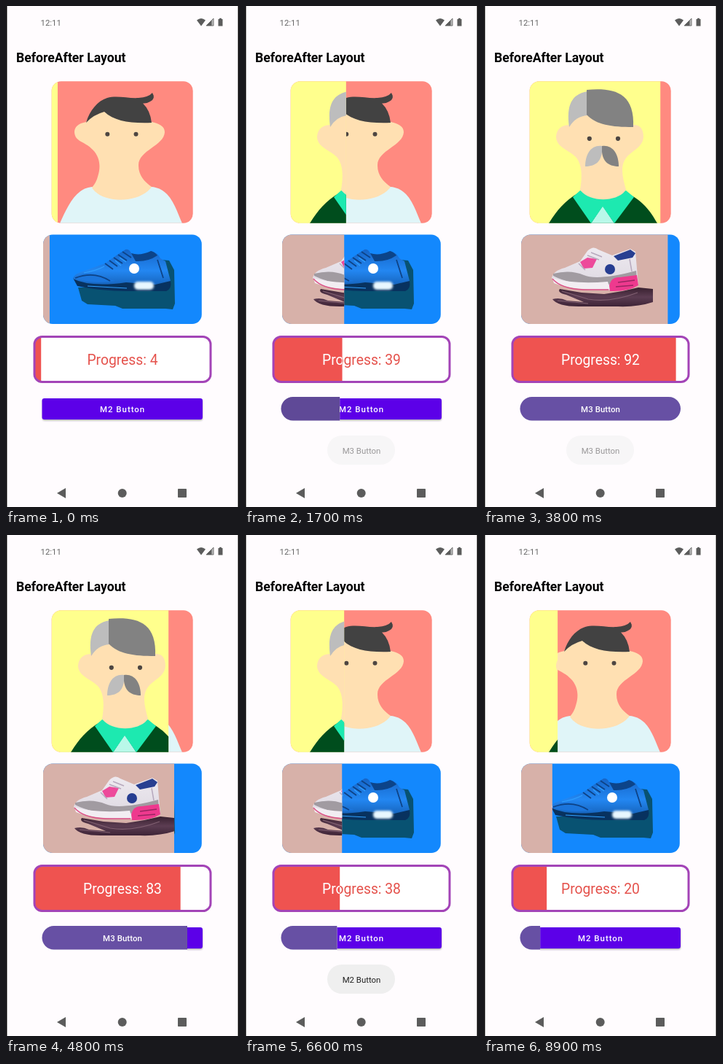
An HTML page for the animation above (9 s loop, 320 by 687 pixels).

```html
<!DOCTYPE html>
<html lang="en">
<head>
<meta charset="utf-8">
<title>BeforeAfter Layout</title>
<style>
  html, body { margin: 0; width: 320px; height: 687px; overflow: hidden; background: #fffcfe; }
  svg { display: block; font-family: Roboto, sans-serif; }
  .mid { text-anchor: middle; }
  .button { font-size: 11.4px; font-weight: 500; fill: #fff; }
  .progress { font-size: 19.3px; }
</style>
</head>
<body>
<svg width="320" height="687" viewBox="0 0 320 687">
  <defs>
    <clipPath id="faceCard"><rect x="62.700" y="103.200" width="194" height="194.500" rx="13"/></clipPath>
    <clipPath id="shoeCard"><rect x="51" y="313.500" width="217.800" height="122.500" rx="13"/></clipPath>
    <clipPath id="barCard"><rect x="38" y="452.500" width="244" height="64" rx="12"/></clipPath>
    <clipPath id="faceSplit"><rect y="100" height="200"/></clipPath>
    <clipPath id="shoeSplit"><rect y="310" height="130"/></clipPath>
    <clipPath id="barSplit"><rect y="450" height="70"/></clipPath>
    <clipPath id="buttonSplit"><rect y="530" height="45"/></clipPath>
    <filter id="soft" x="-10%" y="-30%" width="120%" height="170%"><feGaussianBlur stdDeviation="1.2"/></filter>
    <filter id="glow" x="-50%" y="-50%" width="200%" height="200%"><feGaussianBlur stdDeviation="1.8"/></filter>
    <linearGradient id="blueShoe" x2="0" y2="1"><stop stop-color="#1565c8"/><stop offset=".6" stop-color="#2387f2"/><stop offset="1" stop-color="#1766c0"/></linearGradient>
    <linearGradient id="paleShoe" x2="0" y2="1"><stop stop-color="#eeeaf0"/><stop offset="1" stop-color="#dcd7e0"/></linearGradient>
    <linearGradient id="hand" x2="0" y2="1"><stop stop-color="#38202f"/><stop offset=".5" stop-color="#5c3d52"/><stop offset="1" stop-color="#3d2336"/></linearGradient>
  </defs>

  <rect width="320" height="687" fill="#fffcfe"/>
  <path d="M.7 0V687M319.300 0V687" stroke="#000" stroke-width="1.400"/>

  <!-- Status bar, title and navigation -->
  <text x="47.500" y="26.700" font-size="11.400" fill="#666">12:11</text>
  <g fill="#5c5c5c">
    <path d="M262 19.500Q268 14.500 274 19.500L268 27.500Z"/>
    <path d="M285 17V27H275Z" fill="#bbb"/>
    <path d="M282.500 19.500V27H275Z"/>
    <path d="M285 17V27H275Z" fill="none" stroke="#5c5c5c" stroke-width=".8"/>
    <path d="M291.500 18H293V16.700H296V18H297.500V27.500H291.500Z"/>
    <path d="M70 668L82 661V675Z"/>
    <circle cx="159.700" cy="668" r="6"/>
    <rect x="236" y="662" width="12" height="12" rx=".8"/>
  </g>
  <text x="14" y="77.300" font-size="17.600" font-weight="700">BeforeAfter Layout</text>

  <!-- Portraits -->
  <g clip-path="url(#faceCard)">
    <rect x="60" y="100" width="200" height="200" fill="#ff8a80"/>
    <path fill="#e0f5f8" d="M74 298C84 276 95 250 118 248H200C226 250 233 278 242 298Z"/>
    <path fill="#ffe0b2" d="M110 159C99 161 94 166 94 173C95 187 108 185 119 197C130 208 130 222 126 234Q124 242 118 249C132 272 184 271 200 248C190 241 182 232 182 219C181 198 217 192 218 173C218 164 209 161 200 159C190 137 120 135 110 159Z"/>
    <path fill="#424242" d="M110 160C115 143 126 130 139 126C152 122 168 127 182 126Q196 125 201 119Q206 127 198 131Q193 134 188 133.500Q198 143 200 160C170 161 149 158 135 145Q120 149 110 160Z"/>
    <g fill="#4d4642"><circle cx="139.300" cy="175.800" r="3"/><circle cx="178.500" cy="175.800" r="3"/></g>
    <g clip-path="url(#faceSplit)">
      <rect x="60" y="100" width="200" height="200" fill="#ffff8d"/>
      <path fill="#004d1d" d="M89 298C100 280 111 267 130 256L163 266L195 256C217 266 228 280 238 298Z"/>
      <path fill="#b9f8e9" d="M147 298L163 274L179 298Z"/>
      <path fill="#1de9b0" d="M132 253L122 262L147 298L163 275L179 298L206 262L195 253L163 265Z"/>
      <path fill="#ffe0b2" d="M117 163C104 163 99 172 99 180C100 194 116 197 126 207C135 217 135 234 132 252C143 269 183 270 195 252C190 234 186 218 197 206C207 196 223 191 218 172C215 163 209 163 205 163L195 145H127Z"/>
      <path fill="#bdbdbd" d="M117 166C113 136 120 121 142 117V150Q126 151 117 166Z"/>
      <path fill="#828282" d="M141 115C178 112 207 118 205 166C175 166 154 163 141 149Z"/>
      <path fill="#bdbdbd" d="M162 192C148 190 139 202 139 220C155 220 161 211 162 200Z"/>
      <path fill="#828282" d="M162 192C176 190 185 202 185 220C169 220 163 211 162 200Z"/>
      <g fill="#4d4642"><circle cx="144.800" cy="181.800" r="3.100"/><circle cx="184" cy="181.800" r="3.100"/></g>
    </g>
  </g>

  <!-- Shoes -->
  <g clip-path="url(#shoeCard)">
    <rect x="50" y="312" width="220" height="125" fill="#1388fd"/>
    <path fill="#085272" d="M99 386L104 404L112 409L150 411L160 415H219L229 416L232 408L231 362L224 349L213 348L195 385Z"/>
    <path fill="#08325f" d="M92 373L98 384Q130 391 165 391H220Q228 388 226 377L218 364L118 370Z"/>
    <path fill="url(#blueShoe)" d="M92 374Q93 367 108 363L136 353L153 341L164 334Q169 333 172 339Q182 346 192 341L199 336Q208 338 212 346L219 350L226 377L205 382L165 379Q116 386 92 374Z"/>
    <path fill="#0c4489" d="M172 339Q184 343 199 336Q204 337 208 342Q195 351 178 350Z"/>
    <path fill="#1b75dc" d="M94 372Q112 362 128 370L150 377Q112 382 94 372Z"/>
    <path fill="none" stroke="#0d4387" stroke-width="1.800" d="M136 353L147 361M142 349L153 357M148 345L160 353M154 341L166 349M160 337L172 345M95 373Q121 363 143 377M208 348L216 373"/>
    <path fill="none" stroke="#2fa0ff" stroke-width="1.200" d="M107 366Q124 363 135 357M112 384L166 387M150 349L158 356M156 345L165 351"/>
    <rect x="176" y="378" width="27" height="11" rx="5" fill="#e8f7ff" filter="url(#glow)"/>
    <circle cx="176" cy="360" r="7" fill="#fff"/>
    <g clip-path="url(#shoeSplit)">
      <rect x="50" y="312" width="220" height="125" fill="#d7b1a9"/>
      <path fill="url(#hand)" d="M94 402Q104 399 114 404L137 406L113 396Q100 393 104 388L134 393L165 395L190 391L212 386L232 388V406Q211 413 184 412H130Q101 412 94 402Z"/>
      <path fill="none" stroke="#816071" stroke-width="1.200" d="M107 391L143 402Q174 407 211 393M101 404L143 408"/>
      <path fill="url(#paleShoe)" d="M93 373Q95 363 111 359L132 350L142 336Q150 328 157 334L176 342L201 333L208 337L212 383Q194 391 165 389Q111 390 93 373Z"/>
      <path fill="#a19ba1" d="M95 367Q119 361 137 369Q156 377 209 363L210 376Q190 382 157 382Q121 383 95 370Z"/>
      <path fill="#f2edf2" d="M94 373Q124 382 170 378L173 388Q125 391 96 380Z"/>
      <path fill="#ee398e" d="M172 383Q175 371 186 372L210 369L212 383Q198 392 173 391Z"/>
      <path fill="none" stroke="#992562" stroke-width="1.500" d="M181 385L205 383M184 379L207 376"/>
      <path fill="#ed4a9b" d="M132 351L142 345L155 347L149 359L137 360Z"/>
      <path fill="#283f91" d="M178 343L201 334L208 339L204 345L184 349Z"/>
      <path fill="none" stroke="#b7a9bd" stroke-width="1.500" d="M130 353L139 362M142 342L158 348M147 338L162 344M200 347L203 364"/>
      <path fill="none" stroke="#dc4d86" stroke-width="1.300" d="M94 374Q106 388 137 389H171"/>
      <circle cx="173" cy="361" r="7" fill="#263d91"/>
    </g>
  </g>

  <!-- Progress -->
  <g clip-path="url(#barCard)">
    <rect x="38" y="452" width="244" height="65" fill="#fff"/>
    <text class="mid progress count" x="160" y="492" fill="#e5534d"></text>
    <g clip-path="url(#barSplit)">
      <rect x="38" y="452" width="244" height="65" fill="#ef5350"/>
      <text class="mid progress count" x="160" y="492" fill="#fff"></text>
    </g>
  </g>
  <rect x="39" y="453.500" width="242" height="62" rx="10.500" fill="none" stroke="#a344b7" stroke-width="3"/>

  <!-- Buttons -->
  <rect x="50" y="540" width="220" height="28.500" rx="3" fill="#000" opacity=".3" filter="url(#soft)"/>
  <rect x="49.500" y="538" width="220.500" height="29" rx="3.200" fill="#5c00e8"/>
  <text class="button" x="129" y="556.800" letter-spacing="1.020">M2 Button</text>
  <g clip-path="url(#buttonSplit)">
    <rect x="45" y="532" width="230" height="41" fill="#fffcfe"/>
    <rect id="pill" x="49.500" y="536" width="220.500" height="32.500" rx="16.250"/>
    <text class="mid button" x="160" y="556.800" letter-spacing=".08">M3 Button</text>
  </g>

  <g id="toast">
    <rect x="113" y="589" width="93" height="40" rx="20" fill="#efefef"/>
    <text id="message" class="mid" x="160" y="613.500" font-size="11.400" fill="#222"></text>
  </g>
</svg>
<script>
  const LOOP = 9000, STEP = 100;
  const KNOTS = [[0, 4.1], [160, 0], [4100, 100], [8114, 0], [9000, 22.15]];
  // Each divider: position at 0 % and travel per percent
  const SPLITS = { face: [63, 1.94], shoe: [51, 2.18], bar: [38.2, 2.44], button: [23.5, 2.73] };
  const $ = id => document.getElementById(id);
  const rects = Object.keys(SPLITS).map(k => [document.querySelector(`#${k}Split rect`), ...SPLITS[k]]);
  const counts = document.querySelectorAll('.count');

  function progressAt(t) {
    const i = KNOTS.findIndex(k => k[0] > t);
    const [t0, p0] = KNOTS[i - 1], [t1, p1] = KNOTS[i];
    return p0 + (p1 - p0) * (t - t0) / (t1 - t0);
  }

  const clamp = v => Math.max(0, Math.min(1, v));
  const fade = (t, from, to) => clamp(Math.min(t - from, to - t) / 220);

  function draw(now) {
    const t = Math.floor(now % LOOP / STEP) * STEP;
    const p = progressAt(t);
    for (const [rect, start, rate] of rects) rect.setAttribute('width', Math.max(0, start + rate * p));
    for (const text of counts) text.textContent = 'Progress: ' + Math.round(p);

    $('pill').setAttribute('fill', t >= 1600 && t < 1900 ? '#5f4997' : '#6750a4');
    $('message').textContent = t < 4500 ? 'M3 Button' : 'M2 Button';
    $('toast').setAttribute('opacity', t < 4500 ? fade(t, 1600, 3900) : fade(t, 5600, 7900));
    requestAnimationFrame(draw);
  }
  draw(performance.now());
</script>
</body>
</html>
```
